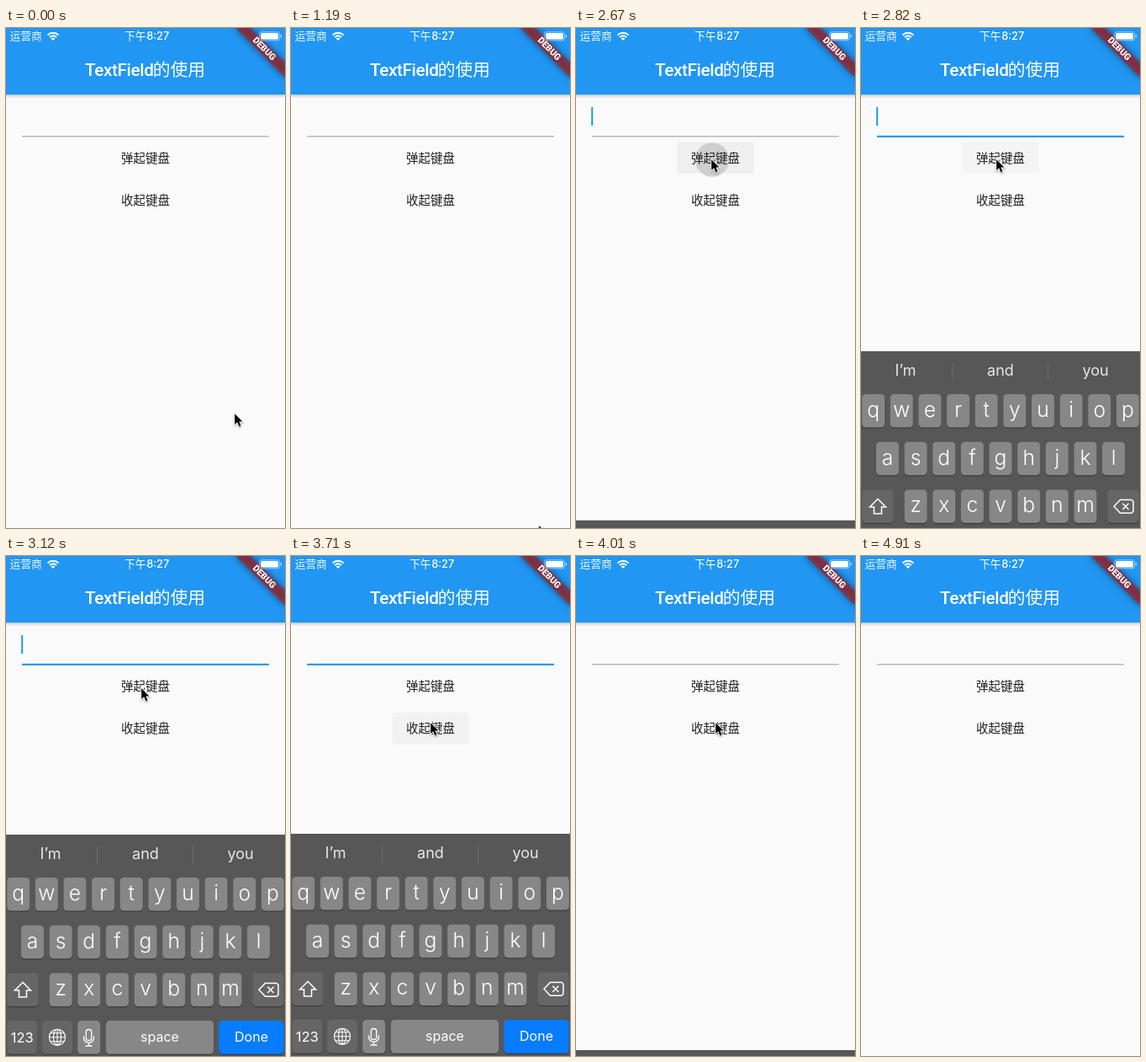
An HTML page with a canvas for the animation above (5200 ms loop, 332 by 594 pixels).

```html
<!DOCTYPE html>
<html lang="zh">
<head>
<meta charset="utf-8">
<style>
html, body { margin: 0; width: 100%; height: 100%; overflow: hidden; background: #fafafa; }
canvas { display: block; width: 332px; height: 594px; }
</style>
</head>
<body>
<canvas id="stage"></canvas>
<script>
const W = 332, H = 594, LOOP = 5200;
const canvas = document.getElementById('stage');
const ctx = canvas.getContext('2d');
const dpr = window.devicePixelRatio || 1;
canvas.width = W * dpr;
canvas.height = H * dpr;

const CJK = '"Noto Sans CJK SC", "Noto Sans CJK", sans-serif';
const LATIN = 'Inter, sans-serif';
const BLUE = '#2196f3';
const KEYBOARD_HEIGHT = 264;

// How many of the n evenly spaced changes between a and b have happened.
function stepsDone(t, a, b, n) {
  if (t < a) return 0;
  return Math.min(n, 1 + Math.floor((t - a) * (n - 1) / (b - a) + 1e-6));
}

// Share of the way still left in a critically damped spring.
const springLeft = x => (1 + x) * Math.exp(-x);
const smooth = p => p * p * (3 - 2 * p);

function rect(x, y, w, h, color) {
  ctx.fillStyle = color;
  ctx.fillRect(x, y, w, h);
}

function roundRect(x, y, w, h, r, color) {
  ctx.beginPath();
  ctx.roundRect(x, y, w, h, r);
  ctx.fillStyle = color;
  ctx.fill();
}

function text(str, x, y, font, color, align = 'center') {
  ctx.font = font;
  ctx.fillStyle = color;
  ctx.textAlign = align;
  ctx.fillText(str, x, y);
}

function stroke(color, width) {
  ctx.strokeStyle = color;
  ctx.lineWidth = width;
  ctx.stroke();
}

function polyline(points, close) {
  points.forEach(([x, y], i) => i ? ctx.lineTo(x, y) : ctx.moveTo(x, y));
  if (close) ctx.closePath();
}

function drawBanner() {
  ctx.save();
  ctx.translate(W, 0);
  ctx.rotate(Math.PI / 4);
  ctx.save();
  ctx.shadowColor = 'rgba(0,0,0,.5)';
  ctx.shadowBlur = 8 * dpr;
  // The caster lies off stage so that only its shadow shows.
  const d = 1000 * Math.SQRT1_2;
  ctx.shadowOffsetX = -1000 * dpr;
  rect(-42 + d, 29 - d, 84, 12.5, '#000');
  ctx.restore();
  rect(-42, 29, 84, 12.5, 'rgba(183,28,28,.63)');
  text('DEBUG', 0, 38.2, '900 10.6px Roboto, sans-serif', '#fff');
  ctx.restore();
}

function drawWifi() {
  const a = -Math.PI * .75, b = -Math.PI * .25;
  ctx.beginPath();
  ctx.moveTo(56, 15);
  ctx.arc(56, 15, 3.4, a, b);
  ctx.closePath();
  ctx.fillStyle = '#fff';
  ctx.fill();
  for (const r of [5.7, 9.2]) {
    ctx.beginPath();
    ctx.arc(56, 15, r, a, b);
    stroke('#fff', 2);
  }
}

function drawBattery() {
  ctx.beginPath();
  ctx.roundRect(301.5, 4.8, 24, 10, 2.5);
  stroke('rgba(255,255,255,.5)', 1);
  roundRect(303, 6, 21, 7.6, 1.5, '#fff');
  roundRect(326.6, 8, 1.5, 3.8, .7, 'rgba(255,255,255,.6)');
}

function drawAppBar() {
  const shade = ctx.createLinearGradient(0, 79, 0, 84);
  shade.addColorStop(0, 'rgba(0,0,0,.24)');
  shade.addColorStop(.4, 'rgba(0,0,0,.09)');
  shade.addColorStop(1, 'rgba(0,0,0,0)');
  rect(0, 79, W, 5, shade);
  rect(0, 0, W, 79, BLUE);
  ctx.letterSpacing = '-0.4px';
  text('TextField', 94, 56.5, '500 20.75px Roboto, sans-serif', '#fff', 'left');
  ctx.letterSpacing = '0px';
  text('的使用', 174.8, 56.5, '500 20.75px ' + CJK, '#fff', 'left');
  drawBanner();
  text('运营商', 4.5, 14.3, '400 12.8px ' + CJK, 'rgba(255,255,255,.93)', 'left');
  text('下午', 141, 14.3, '500 12.8px ' + CJK, '#fff', 'left');
  text('8:27', 194.3, 14.3, '500 12.8px ' + LATIN, '#fff', 'right');
  drawWifi();
  drawBattery();
}

function drawButton(label, top, highlight, splash) {
  if (highlight) roundRect(120.3, top, 91.4, 37.4, 2, highlight);
  if (splash) {
    ctx.beginPath();
    ctx.arc(splash[0], splash[1], 20.3, 0, Math.PI * 2);
    ctx.fillStyle = '#cfcfcf';
    ctx.fill();
  }
  text(label, 166, top + 24.3, '500 14.5px ' + CJK, '#212121');
}

function drawKey(x, y, w, color) {
  roundRect(x, y + 1.2, w, 39.6, 4.5, '#3c3c3c');
  roundRect(x, y, w, 39.6, 4.5, color);
}

function drawLetters(row, x, y) {
  [...row].forEach((ch, i) => {
    const left = x + i * 33.63;
    drawKey(left, y, 27, '#878787');
    text(ch, left + 13.5, y + 26.8, '300 24.7px ' + LATIN, '#fff');
  });
}

function drawShift() {
  ctx.beginPath();
  polyline([[20, 175.5], [29.5, 185], [24.5, 185], [24.5, 193],
    [15.5, 193], [15.5, 185], [10.5, 185]], true);
  stroke('#fff', 1.5);
}

function drawDelete() {
  ctx.beginPath();
  polyline([[301, 184.3], [308.5, 176.5], [322, 176.5], [324, 178.5],
    [324, 190.2], [322, 192.2], [308.5, 192.2]], true);
  polyline([[311.3, 180.7], [318.5, 188]]);
  polyline([[318.5, 180.7], [311.3, 188]]);
  stroke('#fff', 1.5);
}

function drawGlobe() {
  const x = 61, y = 240.8, r = 9.6;
  ctx.beginPath();
  ctx.arc(x, y, r, 0, Math.PI * 2);
  ctx.moveTo(x + 4.5, y);
  ctx.ellipse(x, y, 4.5, r, 0, 0, Math.PI * 2);
  polyline([[x, y - r], [x, y + r]]);
  polyline([[x - r, y], [x + r, y]]);
  polyline([[x - 8, y - 5], [x + 8, y - 5]]);
  polyline([[x - 8, y + 5], [x + 8, y + 5]]);
  stroke('#fff', 1.1);
}

function drawMic() {
  const x = 98.5;
  ctx.beginPath();
  ctx.roundRect(x - 3.3, 231.5, 6.6, 13, 3.3);
  ctx.moveTo(x + 6, 239.5);
  ctx.arc(x, 241.3, 6, 0, Math.PI);
  ctx.lineTo(x - 6, 239.5);
  polyline([[x, 247.3], [x, 251]]);
  polyline([[x - 4, 251], [x + 4, 251]]);
  stroke('#fff', 1.3);
}

function drawKeyboard(top) {
  if (top >= H) return;
  ctx.save();
  ctx.translate(0, top);
  rect(0, 0, W, KEYBOARD_HEIGHT + 1, '#575757');
  ['I’m', 'and', 'you'].forEach((word, i) =>
    text(word, 53 + i * 113, 28.5, '400 18px ' + LATIN, '#e8e8e8'));
  rect(108, 13, 1, 22, '#6b6b6b');
  rect(222, 13, 1, 22, '#6b6b6b');

  drawLetters('qwertyuiop', 1.2, 51);
  drawLetters('asdfghjkl', 18, 107.7);
  drawLetters('zxcvbnm', 51.7, 164.4);

  const dark = '#666';
  drawKey(1.2, 164.4, 37.5, dark);
  drawKey(293.3, 164.4, 37.5, dark);
  drawShift();
  drawDelete();

  const y = 221.1, font = '400 16px ' + LATIN;
  drawKey(1.2, y, 36, dark);
  drawKey(43, y, 36, dark);
  drawKey(85.2, y, 27, '#878787');
  drawKey(119, y, 128, '#878787');
  drawKey(253.2, y, 77.6, '#087cff');
  text('123', 19.3, 247, '400 16.5px ' + LATIN, '#fff');
  text('space', 183, 246.3, font, '#fff');
  text('Done', 292, 246.3, font, '#fff');
  drawGlobe();
  drawMic();
  ctx.restore();
}

function drawPointer([x, y]) {
  ctx.save();
  ctx.translate(x, y);
  ctx.beginPath();
  polyline([[1.2, 1.2], [1.2, 14], [4.2, 11.3], [6.4, 16.4],
    [8.6, 15.4], [6.4, 10.5], [10.4, 10.5]], true);
  ctx.shadowColor = 'rgba(0,0,0,.35)';
  ctx.shadowBlur = 2 * dpr;
  ctx.shadowOffsetY = dpr;
  stroke('#fff', 1.8);
  ctx.shadowColor = 'transparent';
  ctx.fillStyle = '#000';
  ctx.fill();
  ctx.restore();
}

const wander = [[271, 457], [272, 465], [278, 507], [287, 562], [294, 590],
  [278, 520], [225, 340], [193, 248]];
const approach = [[193, 248], [178, 205], [154, 168], [149, 159], [160, 155]];
const toSecond = [[160, 155], [160, 155], [160, 155], [160, 155], [160, 156],
  [161, 163], [163, 182], [165, 195], [165, 197]];

function pointerAt(t, opening, closing) {
  if (t >= 4910) return null;
  if (closing) {
    const p = smooth(Math.max(0, closing - 2) / 5);
    return [165 + 133 * p, 197 + 358 * p];
  }
  if (opening) return toSecond[opening];
  if (t >= 1920) return approach[stepsDone(t, 1920, 2370, 4)];
  return wander[stepsDone(t, 740, 1630, 7)];
}

function keyboardTop(opening, closing) {
  let shown = 0;
  if (closing) shown = springLeft(2.9 + 2.68 * (closing - 1));
  else if (opening) shown = 1 - springLeft(.28 + 2.68 * (opening - 1));
  return Math.round(H - KEYBOARD_HEIGHT * shown);
}

function draw(t) {
  const opening = stepsDone(t, 2670, 3710, 8);
  const closing = stepsDone(t, 3860, 4760, 7);
  ctx.setTransform(dpr, 0, 0, dpr, 0, 0);
  rect(0, 0, W, H, '#fafafa');
  drawAppBar();

  const focused = opening > 1 && !closing;
  if (focused) rect(19, 127.8, 294, 2.1, BLUE);
  else rect(19, 128.3, 294, 1.1, '#a0a0a0');
  if (opening > 0 && opening < 5) rect(18.2, 94, 2, 22, BLUE);

  const first = ['', '#efefef', '#f4f4f4'][opening] || '';
  const second = closing === 1 ? '#efefef' : opening === 8 && !closing ? '#f2f2f2' : '';
  drawButton('弹起键盘', 135.5, first, opening === 1 && [162, 156.5]);
  drawButton('收起键盘', 186, second, closing === 1 && [167, 199]);

  drawKeyboard(keyboardTop(opening, closing));
  const pointer = pointerAt(t, opening, closing);
  if (pointer) drawPointer(pointer);
}

const start = performance.now();
function tick() {
  draw((performance.now() - start) % LOOP);
  requestAnimationFrame(tick);
}
tick();
</script>
</body>
</html>
```
